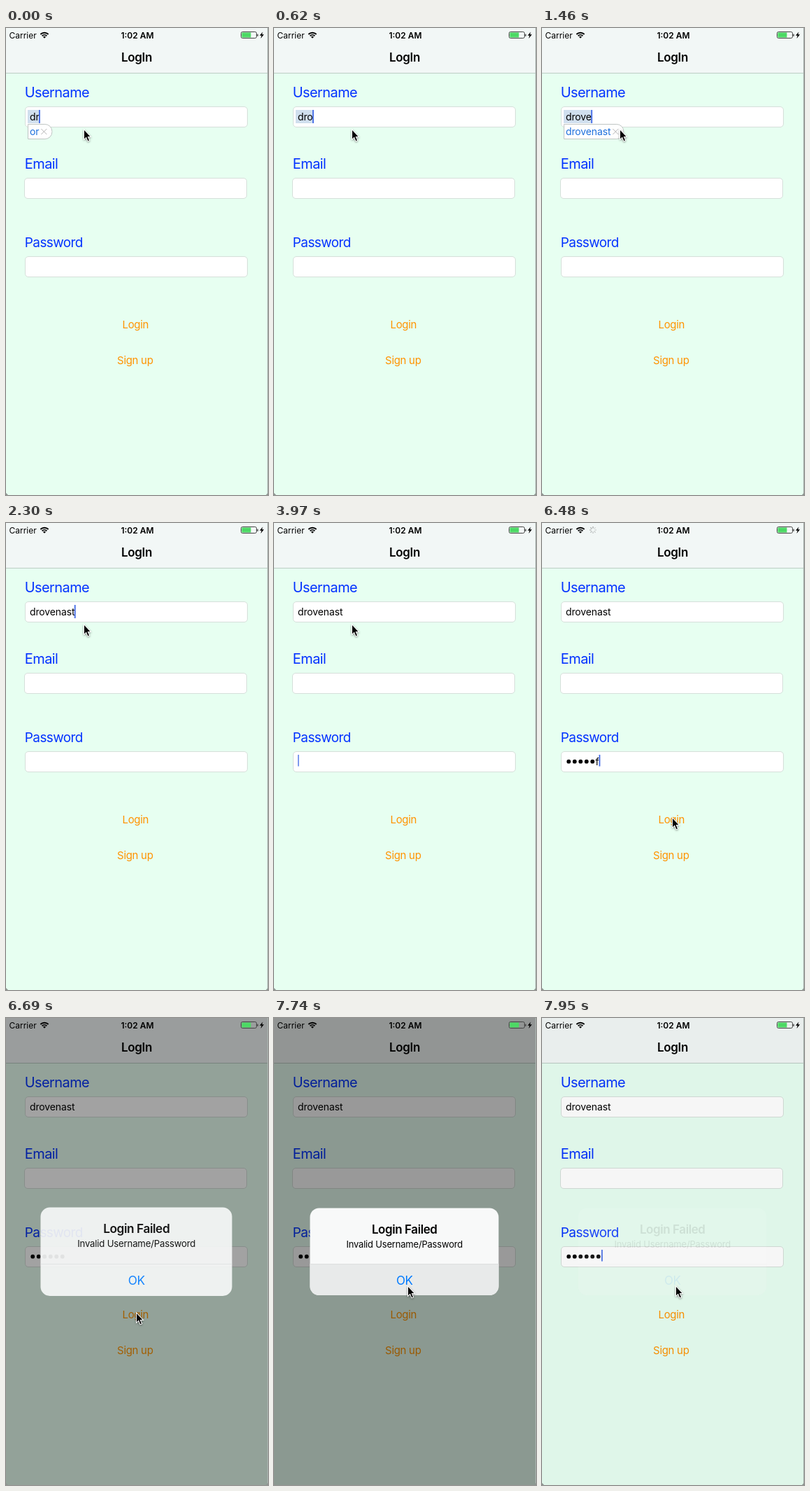
Write an HTML page with a canvas that moves like this. It is 375 px wide and 667 px high and loops after 8 s.

```html
<!DOCTYPE html>
<html lang="en">
<head>
<meta charset="utf-8">
<title>Login form</title>
<style>
  html, body { margin: 0; width: 100%; height: 100%; overflow: hidden; background: #e7fff1; }
  canvas { display: block; width: 375px; height: 667px; }
</style>
</head>
<body>
<canvas id="stage"></canvas>
<script>
const W = 375, H = 667, LOOP = 8000, BEAT = 209.2;
const NAME = 'drovenast', SECRET = 'kdmalf';
const BLUE = '#0433ff', ORANGE = '#ff9300', CARET = '#4069e6';
const TEXT_X = 34, DOT = 8.5, MID_X = 186.7;
const USER_Y = 112, EMAIL_Y = 214, PASS_Y = 326;
const REST = [112, 146], LOGIN = [187, 422], OK = [192, 384];

const canvas = document.getElementById('stage');
const ctx = canvas.getContext('2d');
const ratio = window.devicePixelRatio || 1;
canvas.width = W * ratio;
canvas.height = H * ratio;

const clamp = (v, lo = 0, hi = 1) => Math.min(hi, Math.max(lo, v));
const ramp = (v, from, to) => clamp((v - from) / (to - from));
const smooth = p => p * p * (3 - 2 * p);
const easeOut = p => 1 - (1 - p) ** 3.5;
const mix = (a, b, p) => a.map((v, i) => v + (b[i] - v) * p);

// The screen refreshes once per beat, so the whole state follows from the beat number.
function stateAt(time) {
  const beat = Math.floor((time + 10) / BEAT);
  const open = easeOut(ramp(beat, 31, 33));
  const close = easeOut(ramp(beat, 37, 39));
  const toLogin = mix(REST, LOGIN, smooth(ramp(beat, 26, 28)));
  const blinking = beat === 1 || beat === 2;
  return {
    typed: clamp(beat - 2, beat < 3 ? 2 : 3, NAME.length),
    hint: beat < 3 ? 'or' : beat >= 5 && beat < 11 ? NAME : '',
    marked: beat < 11,
    focus: beat < 14 ? 'user' : beat < 16 ? 'email' : beat < 32 || beat > 37 ? 'pass' : '',
    caret: blinking ? 0 : clamp(Math.abs(beat - 20.2) * 0.62),
    secret: clamp(beat - 22, 0, SECRET.length),
    masked: beat >= 32,
    mouse: mix(toLogin, OK, smooth(ramp(beat, 34, 36))),
    loginAlpha: beat === 29 ? 0.3 : 1,
    spinning: beat === 30 || beat === 31,
    turn: beat,
    shown: open * (1 - close),
    scale: 1 + 0.17 * (1 - open),
    pressed: beat >= 37
  };
}

function setFont(size, weight = 400, spacing = -0.02) {
  ctx.font = `${weight} ${size}px Inter, sans-serif`;
  ctx.letterSpacing = `${size * spacing}px`;
}

function text(str, x, y, color, align = 'left') {
  ctx.fillStyle = color;
  ctx.textAlign = align;
  ctx.fillText(str, x, y);
}

function rect(x, y, w, h, color) {
  ctx.fillStyle = color;
  ctx.fillRect(x, y, w, h);
}

function roundRect(x, y, w, h, radii, fill, stroke) {
  ctx.beginPath();
  ctx.roundRect(x, y, w, h, radii);
  if (fill) { ctx.fillStyle = fill; ctx.fill(); }
  if (stroke) { ctx.strokeStyle = stroke; ctx.lineWidth = 1; ctx.stroke(); }
}

function polygon(points, color) {
  ctx.beginPath();
  points.forEach(([x, y]) => ctx.lineTo(x, y));
  ctx.closePath();
  ctx.fillStyle = color;
  ctx.fill();
}

function line(x1, y1, x2, y2) {
  ctx.beginPath();
  ctx.moveTo(x1, y1);
  ctx.lineTo(x2, y2);
  ctx.stroke();
}

function withAlpha(alpha, draw) {
  ctx.save();
  ctx.globalAlpha = alpha;
  draw();
  ctx.restore();
}

function drawCaret(x, fieldY, alpha, height = 16.5) {
  withAlpha(alpha, () => rect(x, fieldY + 5, 1.8, height, CARET));
}

function field(x, y) {
  roundRect(x + 0.5, y + 0.5, 318, 29, 4.5, '#fff', '#d6dfda');
}

function drawHint(word) {
  setFont(14, 400, -0.01);
  const end = TEXT_X + ctx.measureText(word).width;
  roundRect(31.5, 137.5, end + 19 - 32, 21, [0, 10, 10, 0], '#fff', '#bfc5c3');
  text(word, TEXT_X, 153, '#1c6fdc');
  const cx = end + 7, cy = 148, r = 4;
  ctx.strokeStyle = '#b5b5b5';
  ctx.lineWidth = 1;
  line(cx - r, cy - r, cx + r, cy + r);
  line(cx - r, cy + r, cx + r, cy - r);
}

function drawUsername(s) {
  setFont(14, 400, -0.01);
  const value = NAME.slice(0, s.typed);
  const end = TEXT_X + ctx.measureText(value).width;
  if (s.marked) rect(31, 117, end - 31, 19, '#d0dfee');
  text(value, TEXT_X, 132, '#000');
  if (s.focus === 'user') drawCaret(end - 0.5, USER_Y, s.caret, 19);
  if (s.hint) drawHint(s.hint);
}

function drawPassword(s) {
  const dots = s.masked ? s.secret : Math.max(0, s.secret - 1);
  let end = TEXT_X + dots * DOT;
  for (let i = 0; i < dots; i++) {
    ctx.beginPath();
    ctx.arc(TEXT_X + (i + 0.5) * DOT, 340.7, 2.9, 0, Math.PI * 2);
    ctx.fillStyle = '#000';
    ctx.fill();
  }
  if (s.secret > dots) {
    setFont(14, 400, -0.01);
    const letter = SECRET[dots];
    text(letter, end, 345.5, '#000');
    end += ctx.measureText(letter).width;
  }
  if (s.focus === 'pass') drawCaret(end, PASS_Y, s.caret);
}

function drawForm(s) {
  rect(0, 0, W, H, '#e7fff1');
  rect(0, 0, W, 64, '#f2f7f6');
  rect(0, 64, W, 1, '#bdcdc5');
  setFont(17, 600);
  text('LogIn', 187, 48, '#000', 'center');

  setFont(20, 400, -0.03);
  text('Username', 26.8, 99, BLUE);
  text('Email', 26.8, 201, BLUE);
  setFont(19, 400, -0.032);
  text('Password', 26.8, 313, BLUE);

  field(27, USER_Y);
  field(26, EMAIL_Y);
  field(27, PASS_Y);
  drawUsername(s);
  if (s.focus === 'email') drawCaret(TEXT_X, EMAIL_Y, s.caret);
  drawPassword(s);

  setFont(15);
  withAlpha(s.loginAlpha, () => text('Login', 185.3, 428.5, ORANGE, 'center'));
  text('Sign up', 184.8, 479.5, ORANGE, 'center');
}

function drawWifi(x, y) {
  const from = -Math.PI * 0.75, to = -Math.PI * 0.25;
  ctx.strokeStyle = ctx.fillStyle = '#000';
  ctx.lineWidth = 1.9;
  for (const r of [4.8, 8]) {
    ctx.beginPath();
    ctx.arc(x, y, r, from, to);
    ctx.stroke();
  }
  ctx.beginPath();
  ctx.moveTo(x, y);
  ctx.arc(x, y, 2.8, from, to);
  ctx.fill();
}

function drawSpinner(x, y, turn) {
  ctx.save();
  ctx.translate(x, y);
  ctx.strokeStyle = '#555';
  ctx.lineWidth = 1;
  for (let i = 0; i < 8; i++) {
    ctx.globalAlpha = 0.25 + 0.45 * ((i + turn) % 8) / 8;
    line(0, -2.4, 0, -5);
    ctx.rotate(Math.PI / 4);
  }
  ctx.restore();
}

function drawStatusBar(s) {
  setFont(12, 400, 0);
  text('Carrier', 4.5, 14.5, '#000');
  setFont(12, 600, 0);
  text('1:02 AM', 188, 14.5, '#000', 'center');
  drawWifi(55, 14.7);
  if (s.spinning) drawSpinner(73, 10, s.turn);

  roundRect(336.5, 5.5, 22, 9, 2, null, '#444');
  rect(337.5, 6.5, 13, 7, '#4cd964');
  roundRect(359.5, 8.5, 1.5, 3.5, [0, 1, 1, 0], '#444');
  polygon([[367.5, 5.5], [363, 10.8], [365.7, 10.8], [364.5, 15], [369.2, 9.3], [366.4, 9.3]], '#000');
}

function drawAlert(s) {
  const w = 270, h = 124.5, x = 51.5, y = 271.5, split = 351, cy = y + h / 2;
  withAlpha(s.shown, () => {
    ctx.translate(MID_X, cy);
    ctx.scale(s.scale, s.scale);
    ctx.translate(-MID_X, -cy);
    roundRect(x, y, w, h, 13, '#f8f9f9');
    if (s.pressed) roundRect(x, split, w, y + h - split, [0, 0, 13, 13], '#e8eaea');
    rect(x, split, w, 0.7, '#d9dcdc');
    setFont(17, 600, -0.025);
    text('Login Failed', MID_X, 307.5, '#000', 'center');
    setFont(13, 400, -0.015);
    text('Invalid Username/Password', MID_X, 327.5, '#000', 'center');
    setFont(17, 400, -0.025);
    text('OK', MID_X, 380.5, '#007aff', 'center');
  });
}

function drawMouse([x, y]) {
  const arrow = [[0, 0], [0, 12.2], [2.9, 9.6], [5.3, 15.2], [7, 14.5], [4.6, 9], [8.4, 9]];
  ctx.save();
  ctx.translate(x, y);
  ctx.shadowColor = 'rgba(0,0,0,0.35)';
  ctx.shadowBlur = 3 * ratio;
  ctx.shadowOffsetY = ratio;
  ctx.strokeStyle = '#fff';
  ctx.lineWidth = 2;
  polygon(arrow, '#000');
  ctx.stroke();
  ctx.shadowColor = 'transparent';
  polygon(arrow, '#000');
  ctx.restore();
}

function drawEdges() {
  rect(374, 0, 1, H, '#a9b3ae');
  polygon([[0, H], [0, H - 3], [3, H]], '#8d9691');
  polygon([[W, H], [W, H - 3], [W - 3, H]], '#8d9691');
}

function render(now) {
  const s = stateAt(now % LOOP);
  ctx.setTransform(ratio, 0, 0, ratio, 0, 0);
  drawForm(s);
  withAlpha(0.4 * s.shown, () => rect(0, 0, W, H, '#000'));
  drawStatusBar(s);
  drawAlert(s);
  drawEdges();
  drawMouse(s.mouse);
}

const startTime = performance.now();
function tick() {
  render(performance.now() - startTime);
  requestAnimationFrame(tick);
}
tick();
</script>
</body>
</html>
```
